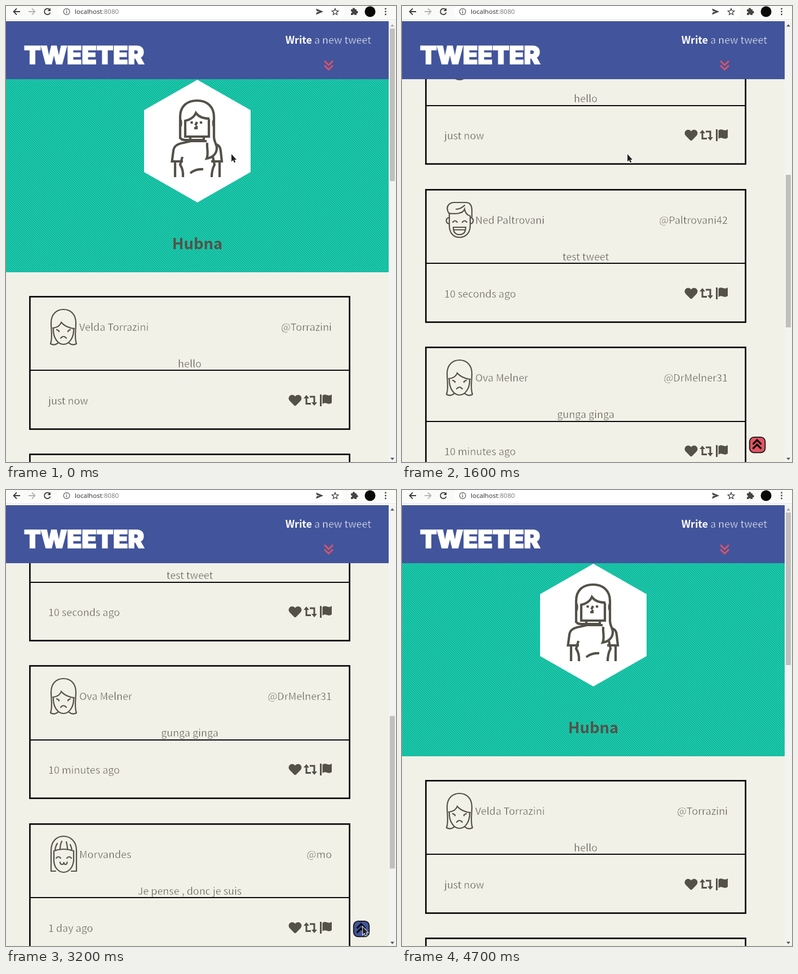
Write an HTML page with a canvas that moves like this. It is 692 px wide and 810 px high and loops after 4900 ms.

```html
<!DOCTYPE html>
<html lang="en">
<head>
<meta charset="utf-8">
<title>Tweeter</title>
<style>
html, body { margin: 0; width: 100%; height: 100%; overflow: hidden; background: #f2f1e8; }
canvas { display: block; }
</style>
</head>
<body>
<canvas id="stage" width="692" height="810"></canvas>
<script>
const ctx = document.getElementById('stage').getContext('2d');
const LOOP = 4900, STEP = 100;
const INK = '#545149', CREAM = '#f2f1e8', BLUE = '#42549b', RED = '#e25563';
const SANS = '"Noto Sans CJK JP", "Noto Sans CJK SC", "Noto Sans", sans-serif';

const cards = [
  { name: 'Velda Torrazini', handle: '@Torrazini', text: 'hello', age: 'just now', face: 'sad' },
  { name: 'Tillie Harnott', handle: '@DrHarnott', text: 'hello', age: 'just now', face: 'happy' },
  { name: 'Ned Paltrovani', handle: '@Paltrovani42', text: 'test tweet', age: '10 seconds ago', face: 'laugh' },
  { name: 'Ova Melner', handle: '@DrMelner31', text: 'gunga ginga', age: '10 minutes ago', face: 'sad' },
  { name: 'Morvandes', handle: '@mo', text: 'Je pense , donc je suis', age: '1 day ago', face: 'happy' }
];

// Line art, with the top of the card (or of the page) as origin
const faces = {
  sad: 'M79 85C83 74 80 60 80 48C80 32 90 24 102 24C114 24 124 32 124 48C124 60 121 74 125 85' +
    'M79 85Q86 89 93 83M125 85Q118 89 111 83M84 57C83 74 92 86 102 86C112 86 121 74 120 58' +
    'M83 57C91 56 96 53 98 47C104 54 112 57 121 58M97 75Q102 69 107 75M90 60l3 1.500M114 60l-3 1.500' +
    'M94 62v1.500M110 62v1.500',
  happy: 'M88 85H80V48C80 32 90 23 102 23C114 23 125 32 125 48V85H116' +
    'M85 49V66C85 79 94 87 102 87C111 87 119 79 120 66V49Q102 43 85 49' +
    'M96 46Q96 38 99 32M109 46Q109 39 107 33M87 48Q88 40 91 36M117 48Q116 42 114 38' +
    'M89 62q4 -5 8 0M108 62q4 -5 8 0M96 69q0 4 3.5 4t3 -4q0 4 3 4t3 -4',
  laugh: 'M84 43V65C84 79 92 86 102 86C112 86 121 79 121 65V48' +
    'M83 43C76 31 84 24 93 24H113C121 24 124 30 124 38V50M83 43C95 45 108 44 111 36Q113 46 121 48' +
    'M96 36Q104 36 111 29M83 51C77 52 77 61 84 62M122 51C128 52 128 61 121 62' +
    'M90 59q4 -5 8 0M107 59q4 -5 8 0M91 68H113Q113 81 102 81Q91 81 91 68M92 72.500H112'
};
const portrait = 'M309 236V197C309 178 321 168 339 168C357 168 369 179 369 197V232C369 241 374 246 374 252' +
  'C374 263 366 269 356 271C360 262 356 254 357 243M318 202V232H360V201M318 204C327 202 334 197 337 190' +
  'C342 197 350 200 361 200M309 233Q310 238 318 238H352M327 233V241M351 233V241' +
  'M309 202C311 202 311 214 309 214M370 202C367 202 367 214 370 214' +
  'M329.500 205v4M346 205v4M339 206L336 212M334 217h4v-4' +
  'M314 276H294.500L297 257C298 248 305 245 315 243L328 240H356M364 276H383L381 258C380 249 377 247 371 245' +
  'M300 277V304M313 268L309 282Q315 291 314 304M379 277V304M367 268L370 282Q365 291 365 304M327 297Q336 289 350 290';
const heart = 'M511.300 194.500L503.500 186.500C500 183 501.500 177.500 506 176C509 175.200 511 176.300 513 178.500' +
  'C515 176.300 517 175.200 520 176C524.500 177.500 526 183 522.500 186.500L514.700 194.500Q513 196 511.300 194.500Z';
const flag = 'M557 175h3v21h-3zM561.500 177C568 172 571 180 578 175V190C571 195 568 187 561.500 192Z';

const clamp = p => Math.max(0, Math.min(1, p));
const swing = p => 0.5 - Math.cos(Math.PI * p) / 2;
const soft = p => (p + swing(p)) / 2;

function scrollAt(t) {
  if (t >= 3200) return 1044.6 * (1 - swing(clamp((t - 3200) / 644) ** 0.75));
  const part = (from, to, dist) => dist * soft(clamp((t - from) / (to - from)));
  return part(400, 700, 227) + part(800, 1600, 524) + part(1700, 2100, 291.6) + part(2300, 2500, 2);
}

const track = [[0, 399, 263], [2000, 399, 263], [2100, 398, 263], [2300, 398, 263], [2900, 628, 772],
  [3000, 632, 776], [3600, 632, 776], [3800, 628, 740], [4000, 178, 188], [4100, 178, 188],
  [4600, 70, 3], [4700, 65, -30], [LOOP, 65, -30]];

function cursorAt(t) {
  const i = track.findIndex(k => k[0] > t);
  const [t0, x0, y0] = track[i - 1], [t1, x1, y1] = track[i];
  const p = (t - t0) / (t1 - t0);
  return [x0 + (x1 - x0) * p, y0 + (y1 - y0) * p];
}

function rect(x, y, w, h, color) {
  ctx.fillStyle = color;
  ctx.fillRect(x, y, w, h);
}

function fill(d, color) {
  ctx.fillStyle = color;
  ctx.fill(new Path2D(d));
}

function line(d, color, width, cap = 'butt') {
  ctx.strokeStyle = color;
  ctx.lineWidth = width;
  ctx.lineCap = cap;
  ctx.stroke(new Path2D(d));
}

function disc(x, y, r, color) {
  ctx.fillStyle = color;
  ctx.beginPath();
  ctx.arc(x, y, r, 0, 7);
  ctx.fill();
}

function text(s, x, y, size, weight, color, align = 'left', family = SANS) {
  ctx.font = `${weight} ${size}px ${family}`;
  ctx.textAlign = align;
  ctx.fillStyle = color;
  ctx.fillText(s, x, y);
  return ctx.measureText(s).width;
}

// Trims the letter edges with the ground colour to get a light weight
function lightText(s, x, y, color, ground, align) {
  const w = text(s, x, y, 17.95, 300, color, align);
  ctx.strokeStyle = ground;
  ctx.lineWidth = 0.55;
  ctx.lineJoin = 'round';
  ctx.strokeText(s, x, y);
  ctx.lineJoin = 'miter';
  return w;
}

function makeWeave() {
  const tile = document.createElement('canvas');
  tile.width = tile.height = 4;
  const c = tile.getContext('2d');
  c.fillStyle = '#1acbad';
  c.fillRect(0, 0, 4, 4);
  c.fillStyle = '#13a088';
  for (let i = 0; i < 4; i++) c.fillRect(i, i, 1, 1);
  return ctx.createPattern(tile, 'repeat');
}
const weave = makeWeave();

function drawProfile() {
  rect(0, 130, 679, 343, weave);
  fill('M339.500 131L434 185V295L339.500 349L245 295V185Z', '#fff');
  line(portrait, INK, 4.2);
  text('Hubna', 339.5, 432, 27.3, 700, INK, 'center');
}

function drawCard(card, y, hover) {
  const top = Math.round(y);
  ctx.save();
  ctx.translate(0, top);
  if (hover) {
    ctx.save();
    ctx.shadowColor = 'rgba(0,0,0,.5)';
    ctx.shadowBlur = 8;
    rect(41, 0, 570, 238, CREAM);
    ctx.restore();
  }
  const put = (s, x, y, align) => lightText(s, x, y, INK, CREAM, align);
  put(card.name, 130, 62);
  put(card.handle, 578, 62, 'right');
  put(card.text, 326, 127, 'center');
  put(card.age, 75, 193);
  line(faces[card.face], INK, 2.2, 'round');
  fill(heart, INK);
  line('M533 180V191.500H541M547 190V179H539', INK, 3);
  fill('M528 182L533 176L538 182ZM542 189L547 195L552 189Z', INK);
  fill(flag, INK);
  ctx.strokeStyle = '#0a0a0a';
  ctx.lineWidth = 2.7;
  ctx.strokeRect(42.4, 1.4, 567.2, 235.2);
  rect(43, Math.round(y + 131.6) - top, 566, 2, '#0a0a0a');
  ctx.restore();
}

function drawHeader() {
  rect(0, 27, 679, 103, BLUE);
  ctx.letterSpacing = '-0.5px';
  text('TWEETER', 32, 103, 43.6, 900, '#fff', 'left', 'Inter, sans-serif');
  ctx.strokeStyle = '#fff';
  ctx.lineWidth = 1.6;
  ctx.strokeText('TWEETER', 32, 103);
  ctx.letterSpacing = '0px';
  const w = lightText(' a new tweet', 648, 67, '#fff', BLUE, 'right');
  text('Write', 648 - w, 67, 17.95, 700, '#fff', 'right');
  line('M565 97.500L572.500 105L580 97.500M565 105.500L572.500 113L580 105.500', '#d9536a', 3);
}

function drawToolbar() {
  rect(0, 0, 692, 27, '#fafaf9');
  ctx.fillStyle = '#fff';
  ctx.beginPath();
  ctx.roundRect(92, -4, 508, 28, 14);
  ctx.fill();
  rect(0, 24, 692, 1, '#e3e2e1');
  const dark = '#3a3a3a';
  line('M25 10H14M19 4.500L13.500 10L19 15.500', dark, 1.8);
  line('M40 10H51M46 4.500L51.500 10L46 15.500', '#b5b5b5', 1.8);
  line('M77.500 6.500A5.300 5.300 0 1 0 78.500 11.500', dark, 1.8);
  fill('M79 3.500V9H73.500Z', dark);
  line('M113 10A5.400 5.400 0 1 0 102.200 10A5.400 5.400 0 1 0 113 10M107.600 9V13M107.600 6.500V8', '#555', 1.2);
  const ui = '"Open Sans", "Noto Sans", sans-serif';
  const w = text('localhost', 122, 14, 11.6, 400, '#2c2c2c', 'left', ui);
  text(':8080', 122 + w, 14, 11.6, 400, '#777', 'left', ui);
  fill('M550 4.500L563 10L550 15.500L551.500 11L557 10L551.500 9Z', '#444');
  line('M584 4.500L585.600 8.300L589.700 8.700L586.600 11.400L587.500 15.400L584 13.300L580.500 15.400L581.400 11.400L578.300 8.700L582.400 8.300Z', '#444', 1.3);
  rect(612, 6, 10, 10, '#444');
  disc(617, 5.5, 2.2, '#444');
  disc(622.5, 11, 2.2, '#444');
  disc(612.5, 11, 1.6, '#fafaf9');
  disc(617, 16, 1.6, '#fafaf9');
  disc(646, 10, 9.5, '#080908');
  for (const y of [5, 10, 15]) disc(673.5, y, 1.4, '#444');
}

function drawScrollbar(scroll) {
  rect(679, 27, 13, 783, '#f3f3f2');
  rect(681, 40 + scroll * 0.346, 9, 271, '#c1c0bf');
  fill('M682 36.500L685.500 32.500L689 36.500Z', scroll < 1 ? '#a5a5a5' : '#505050');
  fill('M682 802.500L685.500 806.500L689 802.500Z', '#505050');
}

function drawTopButton(hover) {
  ctx.beginPath();
  ctx.roundRect(616.8, 765.8, 27.6, 27.6, 8);
  ctx.fillStyle = hover ? BLUE : RED;
  ctx.fill();
  ctx.strokeStyle = '#151515';
  ctx.lineWidth = 1.8;
  ctx.stroke();
  line('M622.500 778.500L630 771L637.500 778.500M622.500 786.500L630 779L637.500 786.500', '#0a0a0a', 3.2);
}

function drawCursor(x, y) {
  ctx.save();
  ctx.translate(x, y);
  const arrow = 'M1 0V13.500L4 10.800L6 15.300L8.200 14.300L6.300 10H10Z';
  line(arrow, 'rgba(255,255,255,.9)', 2);
  fill(arrow, '#222');
  ctx.restore();
}

function draw(t) {
  const scroll = scrollAt(t);
  const [cx, cy] = cursorAt(t);
  rect(0, 0, 692, 810, CREAM);
  ctx.save();
  ctx.beginPath();
  ctx.rect(0, 130, 679, 680);
  ctx.clip();
  ctx.save();
  ctx.translate(0, -Math.round(scroll));
  drawProfile();
  ctx.restore();
  cards.forEach((card, i) => {
    const y = 514.8 + 280.4 * i - scroll;
    const hover = t >= 2400 && t < 2900 && cx < 611 && cy > y && cy < y + 238;
    drawCard(card, y, hover);
  });
  ctx.restore();
  if (scroll > 30) drawTopButton(cx > 616 && cx < 645 && cy > 765);
  drawHeader();
  drawToolbar();
  drawScrollbar(scroll);
  drawCursor(cx, cy);
}

function frame() {
  const t = performance.now() % LOOP;
  draw(Math.floor(t / STEP) * STEP);
  requestAnimationFrame(frame);
}
frame();
</script>
</body>
</html>
```
